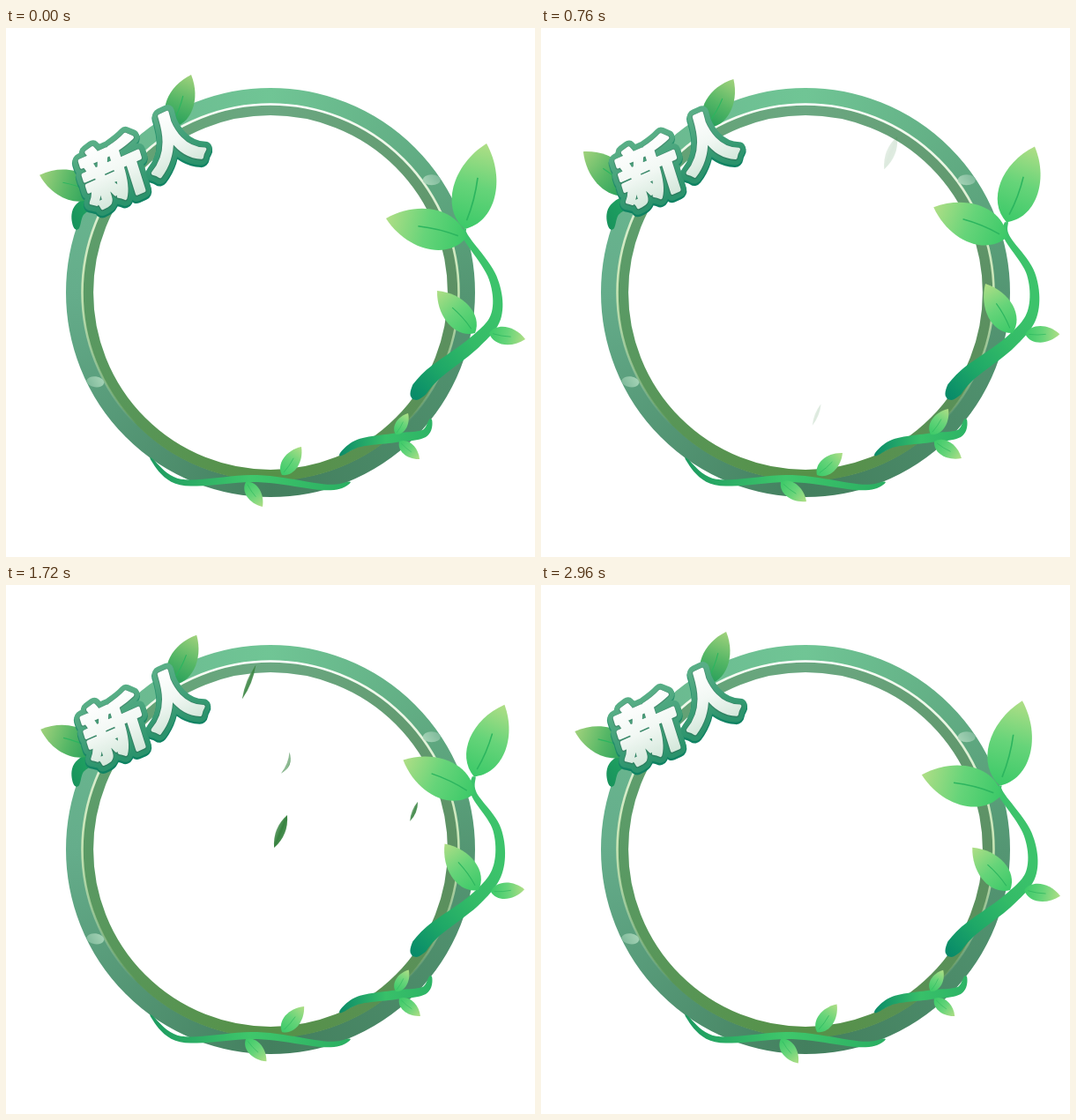
These frames come from a looping animation (600 by 600 pixels, 3000 ms). An HTML page with a canvas:

```html
<!DOCTYPE html>
<html lang="zh">
<head>
<meta charset="utf-8">
<title>Leaf ring</title>
<style>
html, body { margin: 0; width: 100%; height: 100%; overflow: hidden; background: #fff; }
canvas { display: block; width: 600px; height: 600px; }
</style>
</head>
<body>
<canvas id="stage" width="600" height="600"></canvas>
<script>
const ctx = document.getElementById('stage').getContext('2d');
const LOOP = 3000, STEP = 40, TAU = Math.PI * 2;
const FONT = '"Noto Sans CJK SC", "Noto Sans CJK", "Noto Sans CJK JP", sans-serif';

const clamp = v => Math.max(0, Math.min(1, v));

function addStops(g, colors) {
  colors.forEach((c, i) => g.addColorStop(i / (colors.length - 1), c));
  return g;
}
const linear = (x1, y1, x2, y2, colors) => addStops(ctx.createLinearGradient(x1, y1, x2, y2), colors);
// Colours run clockwise from the right
const conic = colors => addStops(ctx.createConicGradient(0, 300, 300), [...colors, colors[0]]);

const PALE = '#c5e3b2', CLEAR = '#c5e3b200', SOFT = '#ecf7e6';
const OUTER = conic(['#549673', '#437f5e', '#65ad8b', '#70c595']);
const INNER = conic(['#5c9063', '#569148', '#5a9a65', '#6ba882']);
const SHINE = conic([PALE, CLEAR, CLEAR, CLEAR, PALE, SOFT, '#ffffff', SOFT]);

function band(r, width, style) {
  ctx.beginPath();
  ctx.arc(300, 300, r, 0, TAU);
  ctx.lineWidth = width;
  ctx.strokeStyle = style;
  ctx.stroke();
}

function glint(angle) {
  ctx.save();
  ctx.translate(300, 300);
  ctx.rotate(angle);
  ctx.beginPath();
  ctx.ellipse(223, 0, 10, 6, 0.6, 0, TAU);
  ctx.fillStyle = linear(214, 0, 232, 0, ['#a4d2b5', '#7fba9b']);
  ctx.fill();
  ctx.restore();
}

function ring() {
  band(222.5, 19, OUTER);
  band(207.2, 12.6, INNER);
  band(213.5, 2.6, SHINE);
  glint(-0.61);
  glint(2.67);
}

// Curve through a few points, drawn with a width that depends on the way along it
function ribbon(pts, width, fill) {
  const left = [], right = [], n = pts.length - 1, steps = n * 12;
  const at = (u, k) => {
    const i = Math.max(0, Math.min(n - 1, Math.floor(u * n))), v = u * n - i;
    const [a, b, c, d] = [i - 1, i, i + 1, i + 2].map(j => pts[Math.max(0, Math.min(n, j))][k]);
    return b + v * (c - a + v * (2 * a - 5 * b + 4 * c - d + v * (3 * (b - c) + d - a))) / 2;
  };
  for (let s = 0; s <= steps; s++) {
    const u = s / steps, x = at(u, 0), y = at(u, 1);
    const dx = at(u + 0.002, 0) - at(u - 0.002, 0), dy = at(u + 0.002, 1) - at(u - 0.002, 1);
    const h = width(u) / 2 / (Math.hypot(dx, dy) || 1);
    left.push([x - dy * h, y + dx * h]);
    right.unshift([x + dy * h, y - dx * h]);
  }
  ctx.beginPath();
  [...left, ...right].forEach(p => ctx.lineTo(...p));
  ctx.fillStyle = fill;
  ctx.fill();
}

const spindle = w => u => w * Math.sqrt(Math.sin(Math.PI * clamp(u)));
const taper = w => u => (4 + (w - 4) * (1 - u)) * Math.sqrt(clamp(u * 12));

const FRESH = ['#3bc968', '#66d479', '#b0de86'];
const SHADY = ['#1f9c58', '#56b766', '#a1d27c'];

// The tip moves by shift * k
function leaf([bx, by], [tx, ty], shift, k, colors = FRESH) {
  const dx = tx + shift[0] * k - bx, dy = ty + shift[1] * k - by;
  const len = Math.hypot(dx, dy), h = len * 0.32;
  ctx.save();
  ctx.translate(bx, by);
  ctx.rotate(Math.atan2(dy, dx));
  ctx.beginPath();
  ctx.moveTo(0, 0);
  ctx.bezierCurveTo(len * 0.16, -h, len * 0.66, -h, len, 0);
  ctx.bezierCurveTo(len * 0.66, h, len * 0.16, h, 0, 0);
  ctx.fillStyle = linear(0, 0, len, 0, colors);
  ctx.fill();
  ctx.beginPath();
  ctx.moveTo(len * 0.1, 0);
  ctx.quadraticCurveTo(len * 0.35, h * 0.1, len * 0.6, 0);
  ctx.lineWidth = len / 60;
  ctx.strokeStyle = '#2cb55f';
  ctx.stroke();
  ctx.restore();
}

// Falling leaves: place and time of appearing, length, bulge to the right and left
const DRIFT = [
  [402, 133, 700, 40, 10, 10],
  [385, 91, 950, 26, 11, -4],
  [491, 211, 1400, 24, 5, 4],
  [304, 64, 1400, 42, 5, 5],
  [473, 172, 1950, 38, 15, -2],
  [250, 65, 2200, 28, 6, -1],
  [318, 430, 700, 26, 4, 4]
];

function drift(t) {
  for (const [x0, y0, start, len, right, left] of DRIFT) {
    const age = t - start, x = x0 - age * 0.0887, y = y0 + age * 0.1436;
    const alpha = clamp(age / 350) * clamp((2760 - t) / 450) * clamp((520 - y) / 80);
    if (!alpha) continue;
    ctx.save();
    ctx.globalAlpha = alpha;
    ctx.translate(x, y);
    ctx.rotate(0.38);
    ctx.beginPath();
    ctx.moveTo(0, -len / 2);
    ctx.quadraticCurveTo(right, 0, 0, len / 2);
    ctx.quadraticCurveTo(-left, 0, 0, -len / 2);
    ctx.fillStyle = linear(-left, 0, right, 0, ['#8db992', '#37823f', '#5f9f68']);
    ctx.fill();
    ctx.restore();
  }
}

const CHARS = [['新', 122, 163, 72], ['人', 188, 128, 67]];

function eachChar(drop, draw) {
  for (const [ch, x, y, size] of CHARS) {
    ctx.save();
    ctx.transform(0.914, -0.407, 0.3, 0.95, x - 156, y - 148 + drop);
    ctx.font = `900 ${size}px ${FONT}`;
    draw(ch, size * 0.38, size / 2);
    ctx.restore();
  }
}

function badge(t) {
  const dip = Math.exp(-(((t - 470) / 150) ** 2));
  const s = 1 - 0.26 * dip + 0.012 * Math.cos(TAU * t / LOOP);
  ctx.save();
  ctx.translate(156, 148);
  ctx.scale(s, s);
  ctx.textAlign = 'center';
  ctx.lineJoin = 'round';
  const edge = (drop, width, colors) => eachChar(drop, (ch, y, half) => {
    ctx.lineWidth = width;
    ctx.strokeStyle = linear(0, -half, 0, half, colors);
    ctx.strokeText(ch, 0, y);
  });
  const face = ['#ffffff', '#f2f8f4', '#d3e7da'];
  edge(2, 18, ['#2f9670', '#0f8262']);
  edge(0, 17, ['#58ae86', '#2b936c']);
  edge(0.5, 6, ['#4b9475', '#2c7f60']);
  edge(0, 4, face);
  eachChar(0, (ch, y, half) => {
    ctx.fillStyle = linear(0, -half, 0, half, face);
    ctx.fillText(ch, 0, y);
  });
  ctx.restore();
}

function frame(t) {
  const half = t % 1500 / 1500;
  const sway = Math.sin(Math.PI * t / LOOP);
  const beat = (1 - Math.cos(TAU * (t - 50) / 1500)) / 2;
  const hop = Math.sin(Math.PI * half);
  const nod = Math.sin(Math.PI * (t < 1200 ? t / 1200 : (t - 1200) / 1800)) ** 2;
  const lift = t < 760 ? t / 760 : (LOOP - t) / (LOOP - 760);

  ctx.clearRect(0, 0, 600, 600);
  ring();
  drift(t);

  // Upper left sprig
  ribbon([[80, 229], [83, 207], [108, 192], [150, 174]], spindle(15),
    linear(76, 225, 140, 180, ['#18935c', '#22a562', '#0f8a5e']));
  leaf([104, 188], [38, 167], [10, -27], beat, SHADY);
  leaf([187, 113], [210, 53], [10, 6], nod, SHADY);
  badge(t);

  // Bottom sprig
  ribbon([[163, 487], [198, 515], [285, 511], [364, 521], [391, 515]], spindle(8),
    linear(163, 0, 391, 0, ['#1d9a60', '#3fc76b', '#2aae62']));
  leaf([313, 507], [335, 475], [7, 7], hop);
  leaf([272, 515], [291, 543], [10, -6], hop);

  // Lower right sprig
  ribbon([[378, 485], [400, 471], [440, 465], [474, 460], [482, 443]], spindle(10.5),
    linear(380, 0, 482, 0, ['#0d8d68', '#38c069', '#2db465']));
  leaf([442, 461], [456, 437], [6, -5], beat);
  leaf([446, 469], [469, 489], [8, -1], beat);

  // Right vine
  const bend = (x, y, dx, dy) => [x + dx * sway, y + dy * sway];
  const top = bend(520, 228, 11, -11), fork = bend(522, 238, 9, -1);
  ribbon([[461, 421], [483, 394], bend(531, 357, 2, -1), bend(556, 326, 2, -4), bend(552, 283, 5, -6), fork, top],
    taper(20), linear(460, 418, 558, 322, ['#078a69', '#1fa867', '#33bb67', '#3cc36b']));
  leaf(fork, [431, 216], [20, -18], sway);
  leaf(top, [545, 131], [21, 5], sway);
  leaf(bend(532, 346, 4, 0), [489, 298], [15, -8], lift);
  leaf(bend(548, 346, 2, 2), [589, 353], [-1, -8], sway);
}

function tick(now) {
  frame(Math.floor(now % LOOP / STEP) * STEP);
  requestAnimationFrame(tick);
}
frame(0);
requestAnimationFrame(tick);
</script>
</body>
</html>
```
